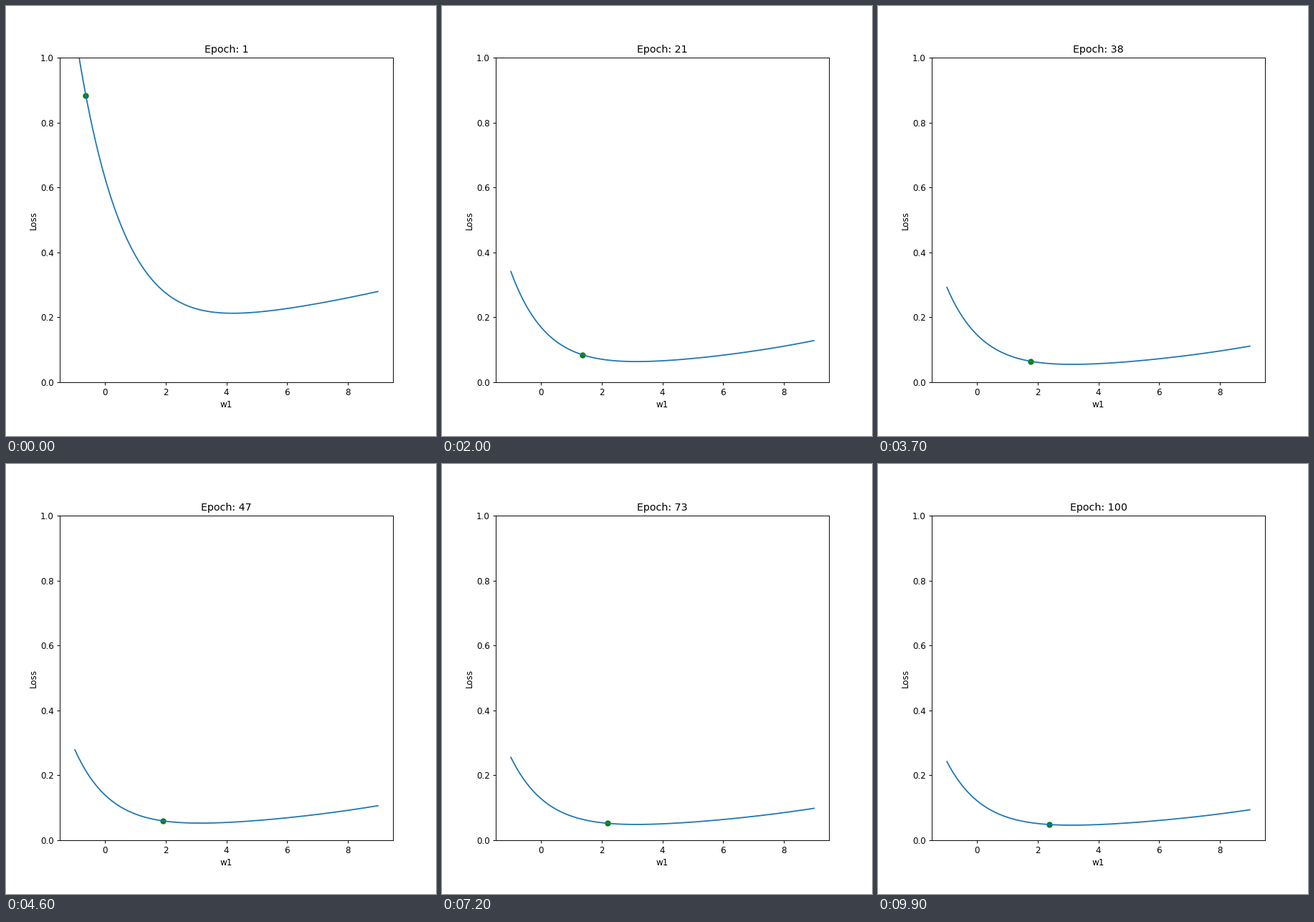
Recreate the animation shown at these times as a matplotlib script. Size 600 by 600 pixels, loop 10 s.

```python
import numpy as np
import matplotlib.pyplot as plt
from matplotlib.animation import FuncAnimation

EPOCHS = 100

# Shape of log-loss: slope of the rise, strength, centre and sharpness of the fall
START = np.array([0.074, 0.673, 2.06, 0.97])
END = np.array([0.147, 0.998, 1.42, 1.0])


def loss_curve(epoch):
    u = np.log(epoch)
    mix = 1 - np.exp(-(epoch - 1) / 3)
    rise, fall, mid, sharp = START + (END - START) * mix
    fall -= 0.007 * u
    log_floor = -1.5488 - 0.5236 * u + 0.042 * u ** 2

    def shape(w):
        return rise * w + fall / sharp * np.logaddexp(0, -sharp * (w - mid))

    lowest = mid + np.log(fall / rise - 1) / sharp
    return lambda w: np.exp(log_floor + shape(w) - shape(lowest))


def weight(epoch):
    u = np.log(epoch)
    return -0.638 + 0.668 * u - 0.0025 * u ** 2


fig = plt.figure(figsize=(7, 7), dpi=600 / 7, facecolor="white")
ax = fig.add_axes([0.125, 0.125, 0.775, 0.755])
ax.set(xlim=(-1.5, 9.5), ylim=(0, 1))
ax.set_xlabel("w1", labelpad=3.2)
ax.set_ylabel("Loss", labelpad=2.8)
ax.set_xticks(range(0, 9, 2))
title = ax.set_title("")

w_axis = np.linspace(-1, 9, 300)
line, = ax.plot([], [], color="tab:blue", lw=1.5)
dot = ax.scatter([0], [0], color="green", zorder=1)


def update(i):
    epoch = i + 1
    loss, w = loss_curve(epoch), weight(epoch)
    line.set_data(w_axis, loss(w_axis))
    dot.set_offsets([[w, loss(w)]])
    title.set_text(f"Epoch: {epoch}")
    return line, dot, title


anim = FuncAnimation(fig, update, frames=EPOCHS, interval=100, repeat=True, repeat_delay=0)
plt.show()
```
